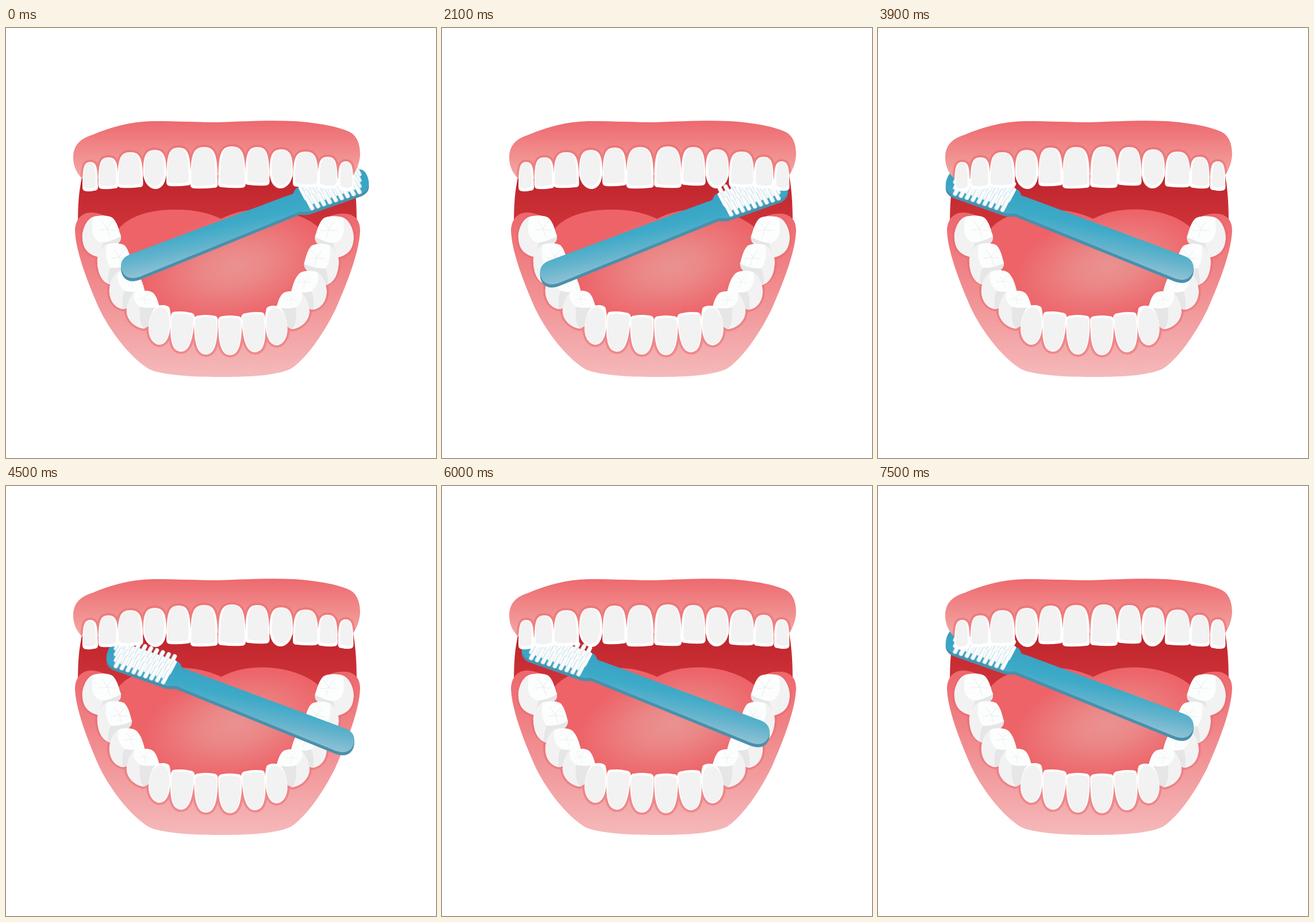
These frames come from a looping animation (748x748 px, 7.8 s). An HTML page:

```html
<!DOCTYPE html>
<html lang="en">
<head>
<meta charset="utf-8">
<title>Brushing teeth</title>
<style>
html, body { margin: 0; width: 100%; height: 100%; overflow: hidden; background: #fff; }
svg { display: block; width: 100%; height: 100%; }
.face { fill: #f2f2f2; stroke: none; }
.shade { fill: #e6e6e6; stroke: none; }
.crown { fill: #fcfdfd; stroke: none; }
.crack { fill: none; stroke: #e8edec; stroke-width: 1; stroke-linecap: round; }
.halo { stroke: #e9666b; stroke-width: 8; opacity: .5; }
</style>
</head>
<body>
<svg viewBox="0 0 748 748">
  <defs>
    <linearGradient id="upperFill" x1="0" y1="0" x2="0" y2="1">
      <stop stop-color="#ed696e"/><stop offset="1" stop-color="#f4aaa6"/>
    </linearGradient>
    <linearGradient id="lowerFill" x1="0" y1="0" x2="0" y2="1">
      <stop stop-color="#ed676c"/><stop offset="1" stop-color="#f5b9ba"/>
    </linearGradient>
    <linearGradient id="throatFill" gradientUnits="userSpaceOnUse" x1="0" y1="260" x2="0" y2="345">
      <stop stop-color="#bf252c"/><stop offset="1" stop-color="#cf333a"/>
    </linearGradient>
    <radialGradient id="tongueFill" gradientUnits="userSpaceOnUse" cx="0" cy="0" r="1"
      gradientTransform="translate(400 415) rotate(-12) scale(165 92)">
      <stop stop-color="#ea9291"/><stop offset=".35" stop-color="#eb8787"/><stop offset="1" stop-color="#ed6368"/>
    </radialGradient>
    <linearGradient id="brushFill" gradientUnits="userSpaceOnUse" x1="300" y1="336.7" x2="320" y2="434.7">
      <stop stop-color="#38a2c2"/><stop offset=".35" stop-color="#3daac8"/>
      <stop offset=".65" stop-color="#62b3cc"/><stop offset=".95" stop-color="#90c2d5"/>
    </linearGradient>
    <path id="upperGum" d="M117 228C116 205 128 193 150 186C180 173 215 163 255 162C300 162 335 164 370 164C420 162 460 160 500 162C545 165 580 172 598 181C612 188 616 205 616 220C615 237 609 248 604 256Q590 264 575 262Q368 250 160 262Q145 266 133 262C124 254 118 243 117 228Z"/>
    <path id="lowerGum" d="M120 352C121 331 133 320 150 321Q165 322 178 330L190 380H545L556 332Q570 322 588 323C605 323 616 333 616 352C615 387 596 438 573 490C552 532 524 574 495 593C470 604 430 607 375 607C340 607 280 606 250 594C218 575 184 532 163 490C140 438 121 387 120 352Z"/>
    <clipPath id="upperClip"><use href="#upperGum"/></clipPath>
    <clipPath id="lowerClip"><use href="#lowerGum"/></clipPath>
    <path id="handle" d="M146 422L421 319.5C428 317.5 431 317 432 313C434 307 438 305 445 303L542 274C553 272 558 280 561 290C564 301 562 309 550 315L468 344C455 349 449 348 442 347.5L164 460.5C148 466 136 462 132 448C129 436 134 427 146 422Z"/>
    <g id="brush">
      <use href="#handle" y="5.5" fill="#4990ac"/>
      <use href="#handle" y="2.5" fill="#4990ac"/>
      <use href="#handle" fill="url(#brushFill)"/>
      <g id="bristles" stroke-linecap="round"></g>
    </g>
    <g id="upperTeeth" fill="#fff"></g>
    <g id="lowerTeeth" fill="#fff">
      <g>
        <path d="M133 365C132 352 140 333 151 329C163 325 182 326 187 332C195 342 196 352 200 362Q201 373 191 377L176 380Q171 398 160 398C144 394 134 385 133 365Z"/>
        <path class="face" d="M151 329C140 333 132 352 133 365C134 385 144 394 160 398L170 373C157 373 150 362 150 350Z"/>
        <path class="shade" d="M169 373Q184 371 200 362Q201 373 191 377L176 380Q171 398 160 398Z"/>
        <path class="crown" d="M151 329C163 325 182 326 187 332C195 342 196 352 200 362Q184 371 169 373C155 371 149 358 150 348Z"/>
      </g>
      <g>
        <path d="M159 408C158 396 166 381 175 377C185 373 200 374 206 378C214 386 216 400 219 409Q219 420 208 424L190 446C170 444 160 430 159 408Z"/>
        <path class="face" d="M175 377C166 381 158 396 159 408C160 430 168 442 180 446L183 418Q171 404 175 377Z"/>
        <path class="shade" d="M182 417Q200 418 219 409Q219 420 208 424L190 446H178Q176 430 182 417Z"/>
        <path class="crown" d="M175 377C185 373 200 374 206 378C214 386 216 400 219 409Q200 418 184 417C174 410 172 390 175 377Z"/>
      </g>
      <g>
        <path d="M180 460C179 448 185 430 196 424C206 420 222 421 228 427C236 436 238 446 241 456Q240 466 230 467L206 489C190 487 181 475 180 460Z"/>
        <path class="face" d="M196 424C185 430 179 448 180 460C181 475 190 487 203 489L207 458Q194 446 196 424Z"/>
        <path class="shade" d="M206 457Q223 462 241 456Q240 466 230 467L212 488H203Q201 470 206 457Z"/>
        <path class="crown" d="M196 424C206 420 222 421 228 427C236 436 238 446 241 456Q224 461 207 457C196 450 192 435 196 424Z"/>
      </g>
      <g>
        <path d="M210 495C209 485 214 468 223 460C234 456 250 456 256 461C262 467 264 475 267 485C263 500 252 520 239 523C225 520 212 510 210 495Z"/>
        <path class="face" d="M223 460C214 468 209 485 210 495C212 510 225 520 236 522L234 485Q222 476 223 460Z"/>
        <path class="shade" d="M233 485Q250 489 267 484C263 500 252 520 239 523Q231 512 233 485Z"/>
        <path class="crown" d="M223 460C234 456 250 456 256 461C262 467 264 475 267 485Q248 488 234 485C223 479 220 468 223 460Z"/>
      </g>
      <path d="M262 484C268 481 280 481 284 486C288 496 287 520 284 532C280 546 274 551 266 551C256 550 247 538 248 520C249 505 254 490 262 484Z"/>
      <path class="face" d="M264 487C272 484 279 487 282 496C286 512 284 532 279 541C274 550 268 551 263 549C252 545 248 530 249 515C251 500 256 491 264 487Z"/>
    </g>
  </defs>

  <path fill="url(#throatFill)" d="M133 255C128 280 125 295 125 345L190 390H545L610 345C610 300 608 280 603 250Z"/>
  <use href="#lowerGum" fill="url(#lowerFill)"/>
  <g clip-path="url(#lowerClip)" class="halo">
    <use href="#lowerTeeth"/><use href="#lowerTeeth" transform="matrix(-1 0 0 1 737.5 1)"/>
  </g>
  <path fill="url(#tongueFill)" d="M190 360C200 334 240 316 292 316C325 315 355 322 374 332C400 318 430 314 460 316C500 319 535 335 548 352C540 400 520 480 440 512H300C220 480 205 420 190 360Z"/>
  <use href="#lowerTeeth"/><use href="#lowerTeeth" transform="matrix(-1 0 0 1 737.5 1)"/>
  <use id="moving" href="#brush"/>
  <use href="#upperGum" fill="url(#upperFill)"/>
  <g clip-path="url(#upperClip)" class="halo">
    <use href="#upperTeeth"/><use href="#upperTeeth" transform="matrix(-1 0 0 1 737.5 -1)"/>
  </g>
  <use href="#upperTeeth"/><use href="#upperTeeth" transform="matrix(-1 0 0 1 737.5 -1)"/>
</svg>
<script>
const el = id => document.getElementById(id);
const add = (id, markup) => el(id).insertAdjacentHTML('beforeend', markup);

function upperTooth(l, r, t, b, pointed) {
  const w = r - l, h = b - t, c = (l + r) / 2;
  const top = `C${l + .01 * w} ${t + .2 * h} ${l + .08 * w} ${t} ${c} ${t}S${r - .01 * w} ${t + .2 * h} `;
  return pointed
    ? `M${l} ${t + .55 * h}${top}${r} ${t + .55 * h}C${r} ${b - .12 * h} ${c + .25 * w} ${b} ${c + 1} ${b}S${l} ${b - .15 * h} ${l} ${t + .55 * h}Z`
    : `M${l} ${b - 7}${top}${r} ${b - 7}Q${r} ${b - 1} ${r - 7} ${b - 1}Q${c} ${b + 1} ${l + 7} ${b}Q${l} ${b} ${l} ${b - 7}Z`;
}

function lowerTooth(l, r, t, b) {
  const h = b - t, c = (l + r) / 2;
  return `M${l} ${t + 9}Q${l} ${t + 1} ${l + 9} ${t + 1}Q${c} ${t - 1} ${r - 9} ${t + 1}Q${r} ${t + 1} ${r} ${t + 9}` +
    `C${r} ${t + .6 * h} ${r - 3} ${b} ${c} ${b}S${l} ${t + .6 * h} ${l} ${t + 9}Z`;
}

// left, right, top, bottom, pointed
[[133, 160, 233, 284], [160.5, 195.5, 225, 280], [194, 238.5, 216, 278],
 [238.5, 279, 212, 280, true], [279, 321.5, 208, 275], [320.5, 368.5, 207, 279]]
  .forEach(([l, r, t, b, pointed]) => add('upperTeeth',
    `<path d="${upperTooth(l, r, t, b, pointed)}"/>
     <path class="face" d="${upperTooth(l + 2, r - 4, t + 1, b - 5, pointed)}"/>`));

[[285, 326.5, 493, 563, 4], [327, 368.5, 499, 568, 0]]
  .forEach(([l, r, t, b, tilt]) => add('lowerTeeth',
    `<g transform="rotate(${tilt} ${(l + r) / 2} ${(t + b) / 2})"><path d="${lowerTooth(l, r, t, b)}"/>
     <path class="face" d="${lowerTooth(l + 2, r - 2, t + 4, b - 1)}"/></g>`));

// centre and scale of the fissures on each molar
[[176, 349, 1], [197, 398, 1], [217, 440, .75], [240, 471, .7]].forEach(([x, y, s], i) =>
  el('lowerTeeth').children[i].insertAdjacentHTML('beforeend',
    `<path class="crack" transform="translate(${x} ${y}) scale(${s})"
      d="M0 0Q-4 -6 -9 -13M0 0Q4 -8 10 -12M0 0Q6 4 14 2M0 0Q2 8 5 15M0 0Q-6 3 -14 2"/>`));

// Back rows first; every other row is shifted by half a column.
for (let row = 0; row < 4; row++) {
  const shift = row % 2 ? 0 : .5;
  for (let col = 9 - (row > 1); col >= 0; col--) {
    const x = 448 + row * 5.2 + (col + shift) * 10.3;
    const y = 316 + row * 8.5 - (col + shift) * 3.5;
    const line = `M${x} ${y}l-9.5 -18`;
    add('bristles', `<path d="${line}" stroke="#d3e2ea" stroke-width="7.6"/>
      <path d="${line}" stroke="#f9fcfd" stroke-width="5.6" transform="translate(-.6 -.3)"/>`);
  }
}

const STEP = 300, STEPS_PER_SIDE = 13;
const swing = [0, 1, 2, 1];
const rightOffsets = [[69, -28], [39.5, -17], [0, 0]];
const leftOffsets = [[-57, -25], [-36, -14], [0, 0]];

function draw() {
  const step = Math.floor(performance.now() / STEP) % (2 * STEPS_PER_SIDE);
  const pose = swing[step % STEPS_PER_SIDE % 4];
  const onRight = step < STEPS_PER_SIDE;
  const [x, y] = (onRight ? rightOffsets : leftOffsets)[pose];
  el('moving').setAttribute('transform',
    onRight ? `translate(${x} ${y})` : `matrix(-1 0 0 1 ${737 + x} ${y})`);
  requestAnimationFrame(draw);
}
draw();
</script>
</body>
</html>
```
